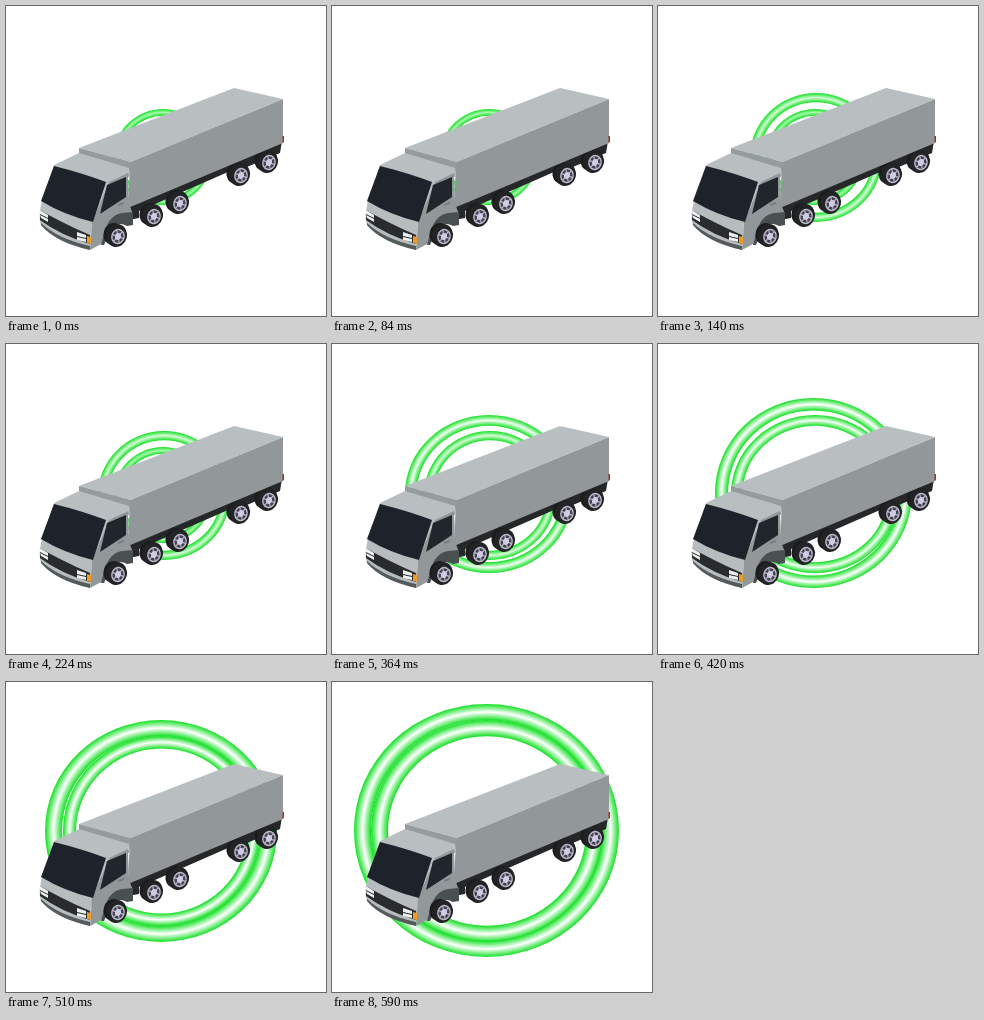
Write an HTML page with a canvas that moves like this. It is 320 px wide and 310 px high and loops after 690 ms.

```html
<!DOCTYPE html>
<html>
<head>
<meta charset="utf-8">
<style>
html, body { margin: 0; width: 100%; height: 100%; overflow: hidden; background: #fff; }
canvas { display: block; }
</style>
</head>
<body>
<canvas id="stage" width="320" height="310"></canvas>
<script>
const ctx = document.getElementById('stage').getContext('2d');
const ends = [140, 280, 420, 510, 590, 690];

// cx, cy, rx, ry, band width, centre colour
const rings = [
  [157, 151, 49, 48, 7, '#a8f9ae'],
  [158, 151.5, 66, 64.5, 9.5, '#d4fcd6'],
  [157, 150, 84, 79, 11.5, '#f0fef1'],
  [155.5, 149, 98.5, 95, 13, '#fff'],
  [155, 149, 116, 111, 17, '#fff'],
  [154.5, 148.5, 132.5, 126.5, 17, '#fff']
];

function ring([cx, cy, rx, ry, width, light]) {
  const inner = rx - width;
  ctx.save();
  ctx.translate(cx, cy);
  ctx.scale(1, ry / rx);
  const g = ctx.createRadialGradient(0, 0, inner, 0, 0, rx);
  g.addColorStop(0, '#12e022');
  g.addColorStop(0.5, light);
  g.addColorStop(1, '#12e022');
  ctx.fillStyle = g;
  ctx.beginPath();
  ctx.arc(0, 0, rx, 0, 7);
  ctx.arc(0, 0, inner, 0, 7);
  ctx.fill('evenodd');
  ctx.restore();
}

function shape(color, path) {
  ctx.fillStyle = color;
  ctx.fill(new Path2D('M' + path + 'Z'));
}

function oval(color, x, y, rx, ry) {
  ctx.fillStyle = color;
  ctx.beginPath();
  ctx.ellipse(x, y, rx, ry, 0.25, 0, 7);
  ctx.fill();
}

function wheel(x, y) {
  oval('#1b1c1d', x - 4, y - 2, 9.5, 11);
  oval('#222324', x - 0.5, y - 0.5, 10.5, 11.5);
  oval('#bcb8cc', x + 1, y + 0.5, 6.8, 7.8);
  oval('#44434c', x + 1, y + 0.5, 5.4, 6.3);
  ctx.strokeStyle = '#bcb8cc';
  ctx.lineWidth = 1.2;
  ctx.beginPath();
  for (let i = 0; i < 6; i++) {
    const a = i * Math.PI / 3 + 0.3;
    ctx.moveTo(x + 1, y + 0.5);
    ctx.lineTo(x + 1 + 5.5 * Math.cos(a), y + 0.5 + 6.4 * Math.sin(a));
  }
  ctx.stroke();
  oval('#d0cbe4', x + 1, y + 0.5, 3, 3.5);
}

function truck() {
  // chassis and trailer
  shape('#252728', '122 200L276 135L274 147L222 169V166L133 205V212L122 214');
  [[262, 156], [234, 169], [173, 197], [147, 210]].forEach(p => wheel(...p));
  shape('#929899', '124 156L277 93V137L122 202');
  shape('#b9bfc1', '73 142L228 82L277 93L125 156');
  shape('#969b9d', '73 142L125 156L123 171L73 150');
  shape('#9c3030', '276.5 130H278V136L276.5 137');

  // cab
  shape('#b9bfc1', '48 159L73 147L123 162Q124 168 121 170L103 177');
  shape('#b7bcbe', '48 159Q74 165 103 176L86 216L84 244Q49 236 35 219Q33 213 34 205L36 194');
  shape('#929899', '103 176L122 167L123 198L127 208L126 215L100 222L97 237L84 244L86 216');
  shape('#4a5052', '99 224Q104 209 116 207L127 206V219L121 220Q112 215 105 223L98 239L95 239');
  shape('#1e232b', '48 160Q76 167 100 176L87 216Q58 209 35 195');
  shape('#20262b', '101 179L120 171V191L94 208');
  shape('#777d7f', '112 198L118 196V198L112 200');
  shape('#292c2d', '34 204Q54 216 84 229V238Q54 229 34 214');
  shape('#555b5d', '35 217Q52 233 84 240V244Q49 236 35 219');
  shape('#eef0f0', '34 204L42 209V212L34 208');
  shape('#eef0f0', '34 209L42 213V216L35 212');
  shape('#eef0f0', '71 226L80 229V232L71 230');
  shape('#eef0f0', '71 231L80 233V236L71 234');
  shape('#ee9b24', '81 230L85 231V238L81 237');
  wheel(111, 230);
}

function draw(now) {
  const t = now % 690;
  const step = ends.findIndex(end => t < end);
  ctx.clearRect(0, 0, 320, 310);
  if (step) ring(rings[step - 1]);
  ring(rings[step]);
  truck();
  requestAnimationFrame(draw);
}
requestAnimationFrame(draw);
</script>
</body>
</html>
```
